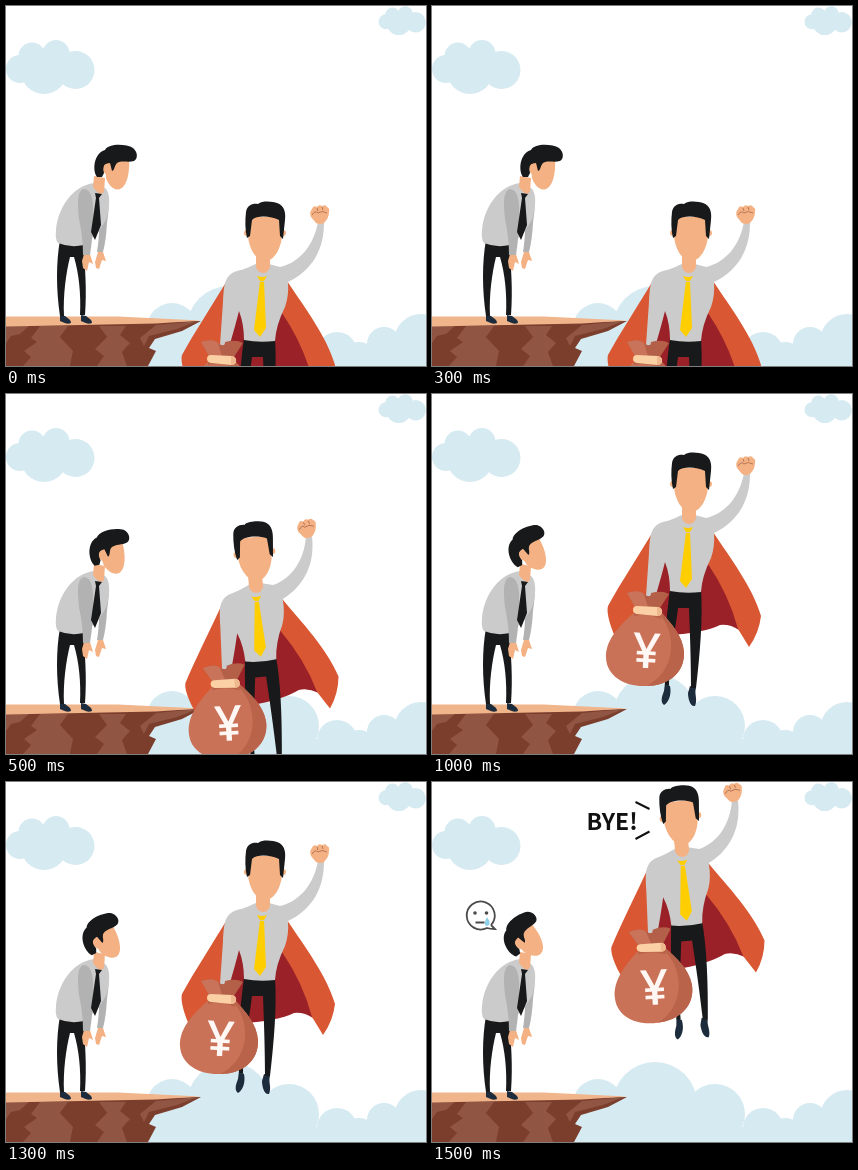
Animation, 420 px wide and 360 px high, one loop 2 s. Source, as an HTML page with a canvas:

```html
<!DOCTYPE html>
<html lang="en">
<head>
<meta charset="utf-8">
<title>Bye</title>
<style>
html, body { margin: 0; width: 100%; height: 100%; overflow: hidden; background: #fff; }
canvas { display: block; width: 420px; height: 360px; }
</style>
</head>
<body>
<canvas id="stage" width="420" height="360"></canvas>
<script>
const ctx = document.getElementById('stage').getContext('2d');
const STEP = 500;
const SKIN = '#f4b183', BLACK = '#18191a', SHIRT = '#cbcbcb', SLEEVE = '#b2b2b2', SHOE = '#1d2c3d';
const SKY = '#d6eaf2', ORANGE = '#d95732', RED = '#992127', YELLOW = '#ffce00';
const RAD = Math.PI / 180;

// One entry per step: tilt of the watching head, and the hero's place and lean.
const POSES = [
  { head: 0, x: 263.5, y: 300.5, lean: 0 },
  { head: -12, x: 261, y: 231.5, lean: -6.3 },
  { head: -27, x: 263.5, y: 163.5, lean: 0 },
  { head: -37, x: 261, y: 107.5, lean: -6.3, bye: true }
];

const fill = (color, d) => {
  ctx.fillStyle = color;
  ctx.fill(new Path2D(d));
};

const stroke = (color, width, d) => {
  ctx.strokeStyle = color;
  ctx.lineWidth = width;
  ctx.stroke(new Path2D(d));
};

const dots = (color, circles) => {
  ctx.fillStyle = color;
  for (const [x, y, r] of circles) {
    ctx.beginPath();
    ctx.arc(x, y, r, 0, 7);
    ctx.fill();
  }
};

// Runs draw with the point (px, py) moved to (x, y) and turned about it.
const placed = (x, y, angle, px, py, draw) => {
  ctx.save();
  ctx.translate(x, y);
  ctx.rotate(angle * RAD);
  ctx.translate(-px, -py);
  draw();
  ctx.restore();
};

function puff() {
  dots(SKY, [[14, 63, 14], [26, 50, 13.5], [50, 47.5, 13.5], [69.5, 64, 19], [38, 65, 23]]);
}

function clouds() {
  puff();
  ctx.save();
  ctx.translate(372.5, -18);
  ctx.scale(0.535, 0.535);
  puff();
  ctx.restore();
  dots(SKY, [[166, 322, 25], [223, 322, 42], [283, 332, 30], [331, 346, 20],
    [353, 355, 19], [378, 338, 17], [415, 335, 27]]);
  fill(SKY, 'M141 322H260L300 345H420V360H141Z');
}

function cliff() {
  fill('#7b3d2c', 'M0 319L195 315L176 325L149 333L143 342L150 345L142 360H0Z');
  fill('#905543', 'M0 320H23L14 328L5 330L0 337Z');
  fill('#905543', 'M34 320H62L54 331L67 345L64 360H17L25 351L18 345L31 336L25 332Z');
  fill('#905543', 'M93 320H120L114 329L124 337L116 346L121 360H91L98 350L89 343L101 331Z');
  fill('#905543', 'M150 319L192 315L171 323L143 330L138 340L134 332Z');
  fill('#f0b58b', 'M0 310.5H112L195 314.5L150 317.5L0 320.5Z');
}

function watcherHead() {
  fill(SKIN, 'M103 154L123 153C124 166 121 183 112 183.5C107 184 102 178 100 172L99 160Z');
  fill(BLACK, 'M91 171C86 164 88 147 99 144C103 137 120 138 127 142C132 146 132 153 128 155C122 157 116 154 111 157C108 160 109 164 106 165L104 157C99 157 97 161 98 167L96 171Z');
  fill(SKIN, 'M104 159C99 155 96 161 98 166C100 170 104 168 105 165Z');
}

function watcher(tilt) {
  fill(SHOE, 'M54 309L59 310C63 313 65 314 65 317C60 319 57 316 54 315ZM75 309L80 310C84 313 86 314 86 317C81 319 78 316 75 315Z');
  fill(BLACK, 'M54 234L77 238C79 259 81 284 79 309H74C75 288 73 268 68 251H64C60 267 57 289 58 310H54C50 284 50 256 54 234Z');
  fill(SKIN, 'M78 248L84 248L87 258L83 256L81 265L77 262L76 255ZM92 246L97 246L100 255L96 254L93 263L90 262L89 256Z');
  fill(SLEEVE, 'M97 183C104 185 104 198 101 217Q100 235 97 246L91 246C94 230 93 211 94 192Z');
  fill(SHIRT, 'M88 177C66 180 52 202 50 224Q49 234 52 237Q64 242 78 239L91 228L100 214C104 202 105 187 99 182Z');
  fill(SLEEVE, 'M78 183C70 185 72 201 73 213Q77 231 77 249L84 249Q88 224 87 199C86 189 84 184 78 183Z');
  fill(SKIN, 'M88 170L99 172L98 186Q94 191 87 181Z');
  fill(BLACK, 'M89 187L96 188L93 192L95 219L89 234L85 226L90 192Z');
  placed(93, 183, tilt, 93, 183, watcherHead);
}

function cape() {
  fill(ORANGE, 'M222 136C207 161 188 190 176 212C174 219 179 236 187 250L240 245L250 170Z');
  fill(RED, 'M232 166L223 200L237 241Q271 239 288 231Q298 230 307 236L292 185L281 145Z');
  fill(ORANGE, 'M281 138C299 165 321 194 329 222Q327 239 317 253Q311 243 306 235Q297 201 276 170Z');
}

function heroBody() {
  fill(SHOE, 'M233 289L238 292C240 301 236 309 232 311C228 308 230 302 232 297ZM258 292L264 294C262 300 266 305 263 312C258 313 256 304 256 299Z');
  fill(BLACK, 'M238 195L269 196C271 223 268 260 264 294H259C259 269 258 239 257 214H246C243 239 237 265 237 291H233Q231 246 238 195Z');
  fill(SHIRT, 'M250 121C241 125 239 126 231 128C218 132 218 143 217 159L214 202L223 204Q229 184 233 168Q238 181 238 197Q253 200 269 198Q270 182 279 164Q283 153 282 139C301 130 318 112 318 80L312 79C308 101 295 119 274 124L263 121Z');
  fill(SKIN, 'M250 112H264V124Q262 130 257 130Q251 129 250 124Z');
  fill(YELLOW, 'M251 133Q256 135 261 133L258 138L260 185L254 194L248 187L254 138Z');
  stroke(SHIRT, 0.8, 'M253 138.5H259');
}

function heroHead() {
  dots(SKIN, [[241, 90, 3], [277, 90, 3]]);
  fill(SKIN, 'M242 74H276V91C276 103 269 118 259 118C249 118 242 103 242 91Z');
  fill(BLACK, 'M241 95C239 87 239 77 240 69C241 62 247 60 252 61C257 57 268 59 271 60C278 62 280 69 279 77L277 96L274 93L273 77C265 73 251 72 246 77L244 93Z');
}

function fist() {
  fill(SKIN, 'M306 66Q307 62 311 64Q313 61 316 63Q320 61 321 64Q324 65 323 69Q323 75 318 80Q314 82 310 80L305 74Q303 69 306 66Z');
  stroke('#9c5f45', 0.7, 'M306 72Q309 67 312 70Q316 67 321 70M311 65L312 68M316 64L317 67');
}

function moneyBag() {
  fill('#b45f47', 'M203 213L195 199Q207 195 212 200Q219 205 219 199Q230 196 237 200L228 214Z');
  fill('#c9735a', 'M203 213L195 199Q207 195 212 200L216 213Z');
  const body = new Path2D('M203 218C190 229 173 245 174 264C175 283 194 293 214 292C236 292 253 279 252 258C251 242 239 229 229 218Z');
  ctx.fillStyle = '#ca7257';
  ctx.fill(body);
  ctx.save();
  ctx.clip(body);
  fill('#b8634a', 'M224 216C246 237 245 277 214 292V300H260V216Z');
  fill('#b8634a', 'M202 217H231L229 225Q216 219 202 222Z');
  ctx.restore();
  fill('#fbd0a5', 'M205 212L226 213Q231 214 230 219Q229 222 225 222L205 220Q201 219 201 216Q201 212 205 212Z');
  fill('#efb78d', 'M225 213Q231 214 230 219Q229 222 225 222Z');
  placed(213.5, 274, 3, 0, 0, () => {
    ctx.fillStyle = '#fff7f3';
    ctx.font = '600 49px "Open Sans", "Noto Sans", sans-serif';
    ctx.textAlign = 'center';
    ctx.fillText('¥', 0, 0);
  });
}

function hero() {
  cape();
  heroBody();
  heroHead();
  fist();
  moneyBag();
}

function farewell() {
  ctx.fillStyle = '#111';
  ctx.font = 'bold 23px "Noto Sans CJK SC", "Open Sans", sans-serif';
  ctx.textAlign = 'left';
  ctx.fillText('BYE!', 154.5, 48);
  stroke('#111', 2, 'M203.5 20L217.5 27M203.5 57L217.5 49.5');
  stroke('#4a4a4a', 1.8, 'M59 143A14 14 0 1 0 55 146Q58 147 63 147Q60 144 59 143M43.5 140.5H52.5');
  dots('#4a4a4a', [[43, 131, 1.8], [54.5, 131, 1.8]]);
  fill('#8fd0ec', 'M55 135Q59 141 57 143Q55 145 53 143Q52 141 55 135Z');
}

function render(now) {
  const pose = POSES[Math.floor(now / STEP) % POSES.length];
  ctx.fillStyle = '#fff';
  ctx.fillRect(0, 0, 420, 360);
  clouds();
  cliff();
  watcher(pose.head);
  placed(pose.x, pose.y, pose.lean, 263.5, 163.5, hero);
  if (pose.bye) farewell();
}

const start = performance.now();
function tick() {
  render(performance.now() - start);
  requestAnimationFrame(tick);
}
tick();
</script>
</body>
</html>
```
